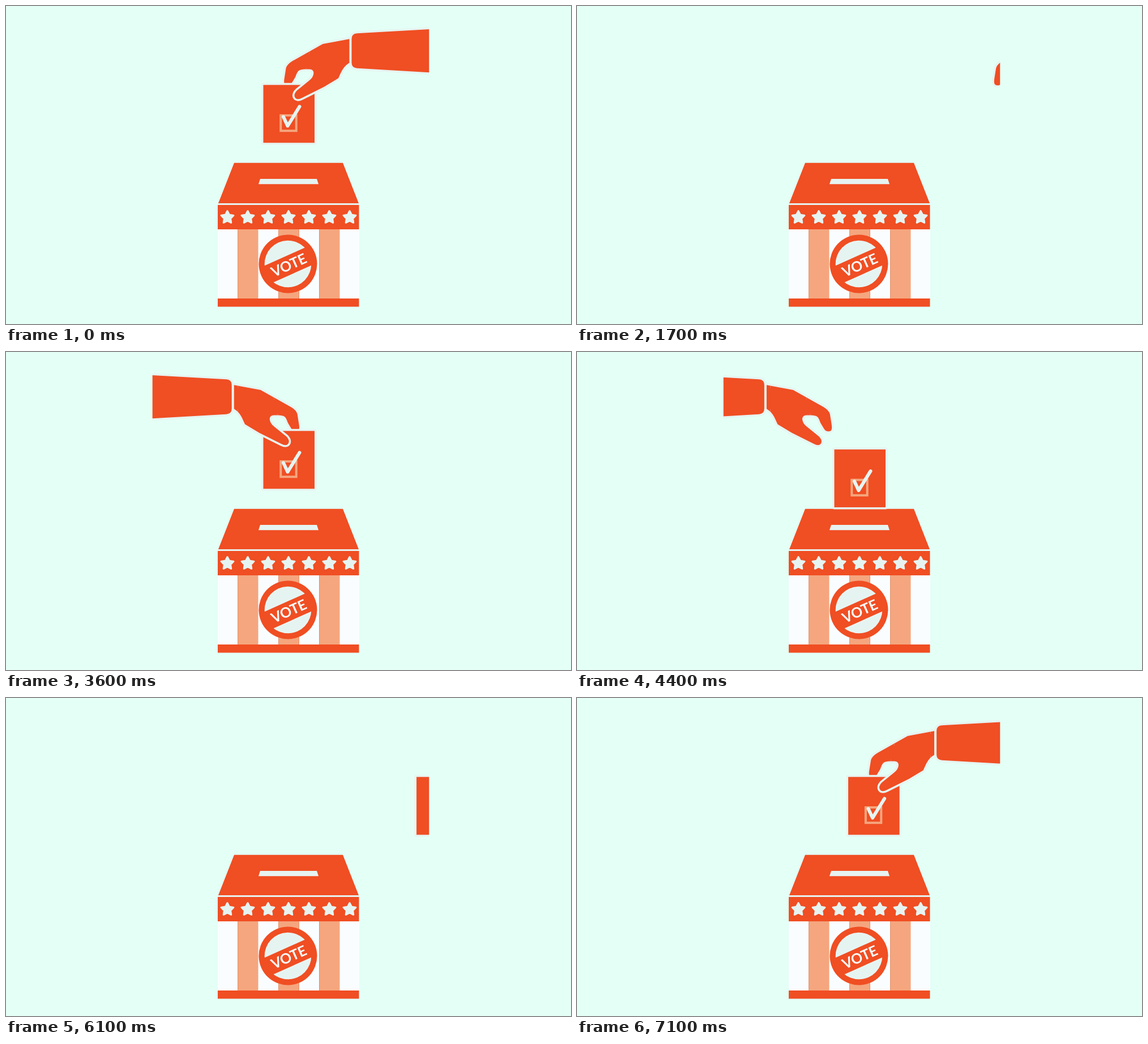
An HTML page that plays this animation: 998x561 px, repeating every 7200 ms.

```html
<!DOCTYPE html>
<html lang="en">
<head>
<meta charset="utf-8">
<title>Ballot box</title>
<style>
  html, body { margin: 0; width: 100%; height: 100%; overflow: hidden; background: #e3fff6; }
  svg { display: block; width: 998px; height: 561px; }
  .red { fill: #f04e23; }
  .pale { fill: #e6f4f1; }
  .peach { fill: #f5a67e; }
  .outlined { fill: #f04e23; stroke: #e6f4f1; stroke-width: 7; paint-order: stroke; stroke-linejoin: round; }
  text { font: 700 25px Lato, sans-serif; text-anchor: middle; fill: #f8fdfd; }
</style>
</head>
<body>
<svg viewBox="0 0 998 561">
  <defs>
    <clipPath id="window"><path d="M258.7 0H747.3V305.5H258.7z"/></clipPath>
    <clipPath id="thumbArea"><path d="M541 60L528 118L514 136L500 150V180H600V60z"/></clipPath>
    <clipPath id="badgeInner"><circle r="46"/></clipPath>
    <path id="palm" class="outlined" d="M606.5 58.3L559.5 67L506 97Q496 103 494.5 110L491.5 129
      C490.5 137 492 140 497 140C501 140 503 138.500 505 135.500L511 125.500C513 121 514 116 518 113.500
      Q521 112 528 111.500H536Q543 111.500 543.5 118Q543 126 535 132L514 149Q508 155 510 160.500
      Q513 167 523 162L562 142.500L587 127.500C592 117 595 107 606.5 100.300Z"/>
  </defs>

  <g id="box">
    <path class="pale" d="M374 346H623.500V353H374z"/>
    <path class="red" d="M403 276.700H595L623 348H375zM374 351H623.500V394H374z"/>
    <path class="pale" d="M449 305H549L552 314.300H446z"/>
    <rect x="374" y="394" width="250" height="122" fill="#fafdff"/>
    <path class="peach" d="M409.500 394h36v122h-36zM481.500 394h36v122h-36zM553.500 394h36v122h-36z"/>
    <path d="M409.500 394v122M481.500 394v122M517.500 394v122M553.500 394v122" stroke="#d9774f" stroke-width=".7"/>
    <path class="red" d="M374 516H623.500V530.500H374z"/>
    <g id="stars" class="pale" stroke="#e6f4f1" stroke-width="3" stroke-linejoin="round"></g>
    <g transform="translate(498 455) rotate(-24)">
      <circle class="red" r="51.500"/>
      <circle class="pale" r="41.300"/>
      <path class="red" clip-path="url(#badgeInner)" d="M-50 -14H50V19.200H-50z"/>
      <text x=".6" y="11.500">VOTE</text>
    </g>
  </g>

  <g clip-path="url(#window)">
    <g class="hand">
      <use href="#palm"/>
      <path class="outlined" d="M620 48.300L780 39.300V119L620 109.700Q610.500 109 610.500 100V58Q610.500 49 620 48.300z"/>
    </g>
    <g id="ballot">
      <rect class="outlined" x="454.500" y="139.300" width="90.500" height="102"/>
      <rect x="485.300" y="193" width="27.400" height="27.200" fill="none" stroke="#f5a67e" stroke-width="4"/>
      <path d="M490 195.500L497.500 211.500L518.500 177.500" fill="none" stroke="#e6f4f1" stroke-width="6"
        stroke-linecap="round" stroke-linejoin="round"/>
    </g>
    <g class="hand"><g clip-path="url(#thumbArea)"><use href="#palm"/></g></g>
  </g>
</svg>
<script>
  const LOOP = 7200, STEP = 100;
  const ballot = document.getElementById('ballot');
  const hands = document.querySelectorAll('.hand');

  function starPoints(cx, cy) {
    return Array.from({ length: 10 }, (_, i) => {
      const r = i % 2 ? 6 : 11.5, a = (i / 5 - 0.5) * Math.PI;
      return `${(cx + r * Math.cos(a)).toFixed(2)},${(cy + r * Math.sin(a)).toFixed(2)}`;
    }).join(' ');
  }

  document.getElementById('stars').innerHTML = Array.from({ length: 7 }, (_, i) =>
    `<polygon points="${starPoints(391 + 36 * i, 373)}"/>`).join('');

  const fall = ms => 52 * (Math.max(0, ms) / 400) ** 1.62;

  // Horizontal hand offset, ballot offset and side at time t
  function pose(t) {
    if (t < 500) return { hand: 0, x: 0, y: 0 };
    if (t < 2100) return { hand: 0.2 * (t - 472), x: 0, y: fall(t - 500) };
    if (t < 4100) {
      const x = -0.2265 * Math.max(0, 3600 - t);
      return { hand: x, x, y: 0, left: true };
    }
    if (t < 5700) return { hand: -0.212 * (t - 4080), x: 0, y: fall(t - 4100), left: true };
    const x = 0.246 * (LOOP - t);
    return { hand: x, x, y: 0 };
  }

  function draw(now) {
    const t = Math.floor((now % LOOP) / STEP) * STEP;
    const { hand, x, y, left } = pose(t);
    const move = left ? `translate(${1009.2 + hand} 0) scale(-1 1)` : `translate(${hand} 0)`;
    hands.forEach(h => h.setAttribute('transform', move));
    ballot.setAttribute('transform', `translate(${x} ${y})`);
  }

  let start;
  function tick(now) {
    start ??= now;
    draw(now - start);
    requestAnimationFrame(tick);
  }
  draw(0);
  requestAnimationFrame(tick);
</script>
</body>
</html>
```
